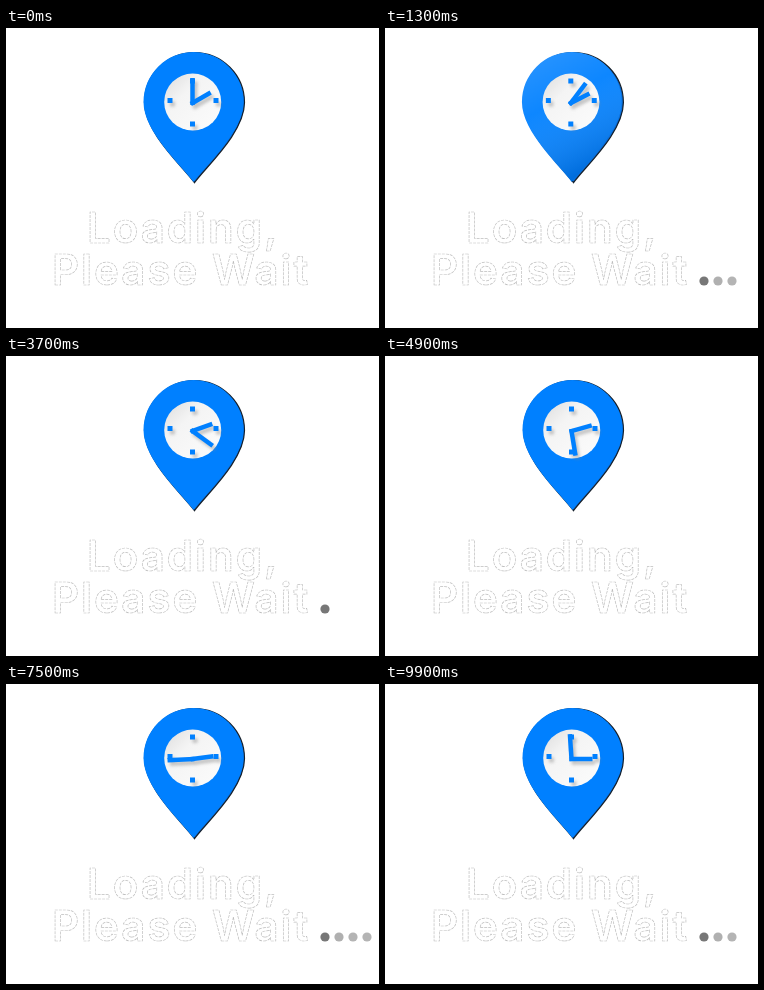
Recreate the animation shown at these times as an HTML page. Size 373x300 px, loop 10000 ms.

```html
<!DOCTYPE html>
<html lang="en">
<head>
<meta charset="utf-8">
<title>Loading</title>
<style>
  html, body { margin: 0; width: 100%; height: 100%; overflow: hidden; background: #fff; }
  svg { display: block; width: 373px; height: 300px; }
  text {
    font: 600 42px Inter, "Open Sans", sans-serif;
    letter-spacing: 2px;
    fill: #fff;
    stroke: #bdbdbd;
    stroke-width: .7;
    stroke-dasharray: 3 1;
  }
</style>
</head>
<body>
<svg viewBox="0 0 373 300">
  <defs>
    <linearGradient id="sheen" x1="0" y1="0" x2=".4" y2="1">
      <stop offset="0" stop-color="#fff" stop-opacity=".2"/>
      <stop offset=".45" stop-color="#fff" stop-opacity=".06"/>
      <stop offset="1" stop-color="#003a80" stop-opacity=".3"/>
    </linearGradient>
    <linearGradient id="dial" x1="0" y1="0" x2="1" y2="1">
      <stop offset="0" stop-color="#dcdcdc"/>
      <stop offset=".35" stop-color="#f4f4f4"/>
      <stop offset="1" stop-color="#fcfcfc"/>
    </linearGradient>
    <filter id="soft" x="-50%" y="-50%" width="200%" height="200%">
      <feGaussianBlur stdDeviation="1.4"/>
    </filter>
    <!-- Origin at the centre of the dial -->
    <path id="pin" d="M0 80 C-11.5 64 -50 30 -50 0 A50 50 0 0 1 50 0 C50 30 11.5 64 0 80Z"/>
    <g id="hands" stroke-width="4.5">
      <path id="hour" d="M0 2V-21"/>
      <path id="minute" d="M0 2V-25"/>
    </g>
    <path id="ticks" stroke-width="5" d="M-1 -23.5v5M-1 19.5v5M-26 -1.5h5M20 -1.5h5"/>
  </defs>

  <g id="far">
    <use href="#pin" fill="#0a6fdc" stroke="#15202c" stroke-width="1.2"/>
    <circle r="28" fill="#fff"/>
  </g>
  <g id="near">
    <use href="#pin" fill="#0080ff"/>
    <use id="shade" href="#pin" fill="url(#sheen)"/>
    <circle cx="-.8" r="28.5" fill="url(#dial)"/>
    <g transform="translate(2.5 3.5)" stroke="#888" opacity=".45" filter="url(#soft)">
      <use href="#ticks"/><use href="#hands"/>
    </g>
    <g stroke="#0080ff">
      <use href="#ticks"/><use href="#hands"/>
    </g>
  </g>

  <text x="81" y="215">Loading,</text>
  <text x="46" y="257">Please Wait</text>
  <g id="dots"></g>
</svg>
<script>
  const LOOP = 10000, START = 300, SPIN = 1400, DOT_STEP = 290;
  const CX = 187.5, CY = 74;
  const $ = id => document.getElementById(id);
  const set = (id, name, value) => $(id).setAttribute(name, value);

  const dots = ["#777", "#b0b0b0", "#b4b4b4", "#b4b4b4"].map((fill, i) => {
    const dot = document.createElementNS("http://www.w3.org/2000/svg", "circle");
    const attrs = { cx: 319 + 14 * i, cy: 253, r: 4.6, fill };
    for (const name in attrs) dot.setAttribute(name, attrs[name]);
    $("dots").append(dot);
    return dot;
  });

  const easeTurn = u => {
    const v = Math.pow(Math.min(1, u), 0.89);
    return v * v * (3 - 2 * v);
  };

  function place(id, dx, dy, scale) {
    set(id, "transform", `translate(${CX + dx} ${CY + dy}) scale(${scale} 1)`);
  }

  function drawPin(t) {
    const angle = 2 * Math.PI * easeTurn(t / SPIN);
    const s = Math.sin(angle), c = Math.cos(angle);
    const side = c < 0 ? -1 : 1;
    const scale = side * Math.max(0.04, Math.abs(c));
    const depth = 5 * s * side;
    place("far", 4.5 * s - depth + Math.abs(c), 0.6, scale);
    place("near", 4.5 * s + depth, 0, scale);
    set("shade", "opacity", Math.min(1, Math.abs(s) * 12));
  }

  function drawHands(t) {
    const turn = Math.max(0, t - START) / (LOOP - START);
    set("minute", "transform", `translate(-1 1) rotate(${360 * turn})`);
    set("hour", "transform", `translate(-1 1) rotate(${60 + 30 * turn})`);
  }

  function drawDots(t) {
    const count = t < START ? 0 : Math.floor((t - START) / DOT_STEP) % 5;
    dots.forEach((dot, i) => dot.setAttribute("visibility", i < count ? "visible" : "hidden"));
  }

  function render(time) {
    const t = Math.floor((time % LOOP) / 100) * 100;
    drawPin(t);
    drawHands(t);
    drawDots(t);
  }

  const begin = performance.now();
  function tick() {
    render(performance.now() - begin);
    requestAnimationFrame(tick);
  }
  tick();
</script>
</body>
</html>
```
